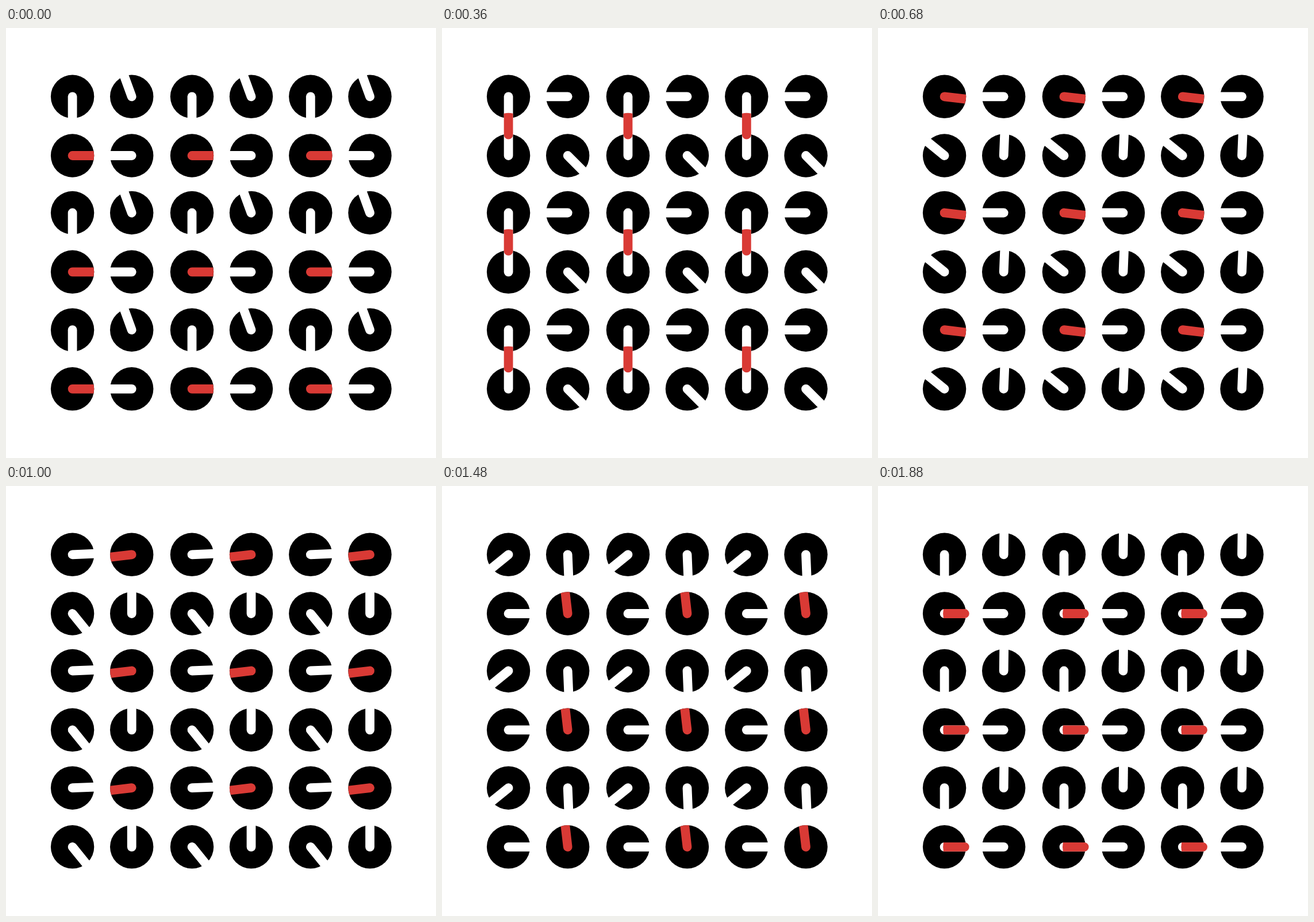
These frames come from a looping animation (748x748 px, 1920 ms). An HTML page with a canvas:

```html
<!DOCTYPE html>
<html lang="en">
<head>
<meta charset="utf-8">
<title>Turning dials</title>
<style>
  html, body { margin: 0; width: 100%; height: 100%; overflow: hidden; background: #fff; }
  canvas { display: block; width: 748px; height: 748px; }
</style>
</head>
<body>
<canvas id="stage" width="748" height="748"></canvas>
<script>
const ctx = document.getElementById('stage').getContext('2d');
const LOOP = 1920, STEP = 40, BEAT = 480, TURN = 240, RETURN_END = 1200;
const R = 37.7;            // disc radius
const H = 7.9;             // half the slot width
const RED = '#d93a35';
const COLS = [115.6, 218.7, 323.5, 426.5, 529.8, 633];
const ROWS = [119.3, 222, 321.5, 424.3, 525.2, 627.8];

// One tile, in the order the red bar visits: column, row, arrival angle.
const DIALS = [
  { col: 0, row: 1, angle: 0 },
  { col: 0, row: 0, angle: 90 },
  { col: 1, row: 0, angle: 180 },
  { col: 1, row: 1, angle: 270 }
];

const ease = p => p * p * (3 - 2 * p);
const span = (t, from, to) => ease(Math.min(1, Math.max(0, (t - from) / (to - from))));
const rad = deg => deg * Math.PI / 180;

const disc = new Path2D();
disc.arc(0, 0, R, 0, 2 * Math.PI);

const slot = new Path2D();
slot.arc(0, 0, H, Math.PI / 2, Math.PI * 1.5);
slot.lineTo(R + 2, -H);
slot.lineTo(R + 2, H);
slot.closePath();

// The bar fills the slot up to the rim of its disc.
const bar = new Path2D();
const rim = Math.asin(H / R);
bar.arc(0, 0, H, Math.PI / 2, Math.PI * 1.5);
bar.arc(0, 0, R, -rim, rim);
bar.closePath();

function paint(path, color, x, y, angle, shift = 0) {
  ctx.save();
  ctx.translate(x, y);
  ctx.rotate(rad(angle));
  ctx.translate(shift, 0);
  ctx.fillStyle = color;
  ctx.fill(path);
  ctx.restore();
}

function drawTile(tx, ty, t) {
  const place = d => [COLS[tx * 2 + d.col], ROWS[ty * 2 + d.row]];
  let moving = null;

  DIALS.forEach((d, i) => {
    const u = (t - i * BEAT + LOOP) % LOOP;   // time since the bar arrived
    const [x, y] = place(d);
    const angle = d.angle - 90 * span(u, 0, TURN) - 270 * span(u, BEAT, RETURN_END);
    const holds = u < TURN;

    paint(disc, '#000', x, y, 0);
    paint(holds ? bar : slot, holds ? RED : '#fff', x, y, angle);

    if (u >= TURN && u < BEAT) {
      const [nx, ny] = place(DIALS[(i + 1) % 4]);
      const path = Math.hypot(nx - x, ny - y) - (R - H);
      moving = [x, y, angle, path * span(u, TURN, BEAT)];
    }
  });

  if (moving) paint(bar, RED, ...moving);
}

function draw(t) {
  ctx.fillStyle = '#fff';
  ctx.fillRect(0, 0, 748, 748);
  for (let ty = 0; ty < 3; ty++)
    for (let tx = 0; tx < 3; tx++) drawTile(tx, ty, t);
}

const start = performance.now();
function tick() {
  const t = (performance.now() - start) % LOOP;
  draw(Math.floor(t / STEP) * STEP);
  requestAnimationFrame(tick);
}
tick();
</script>
</body>
</html>
```
